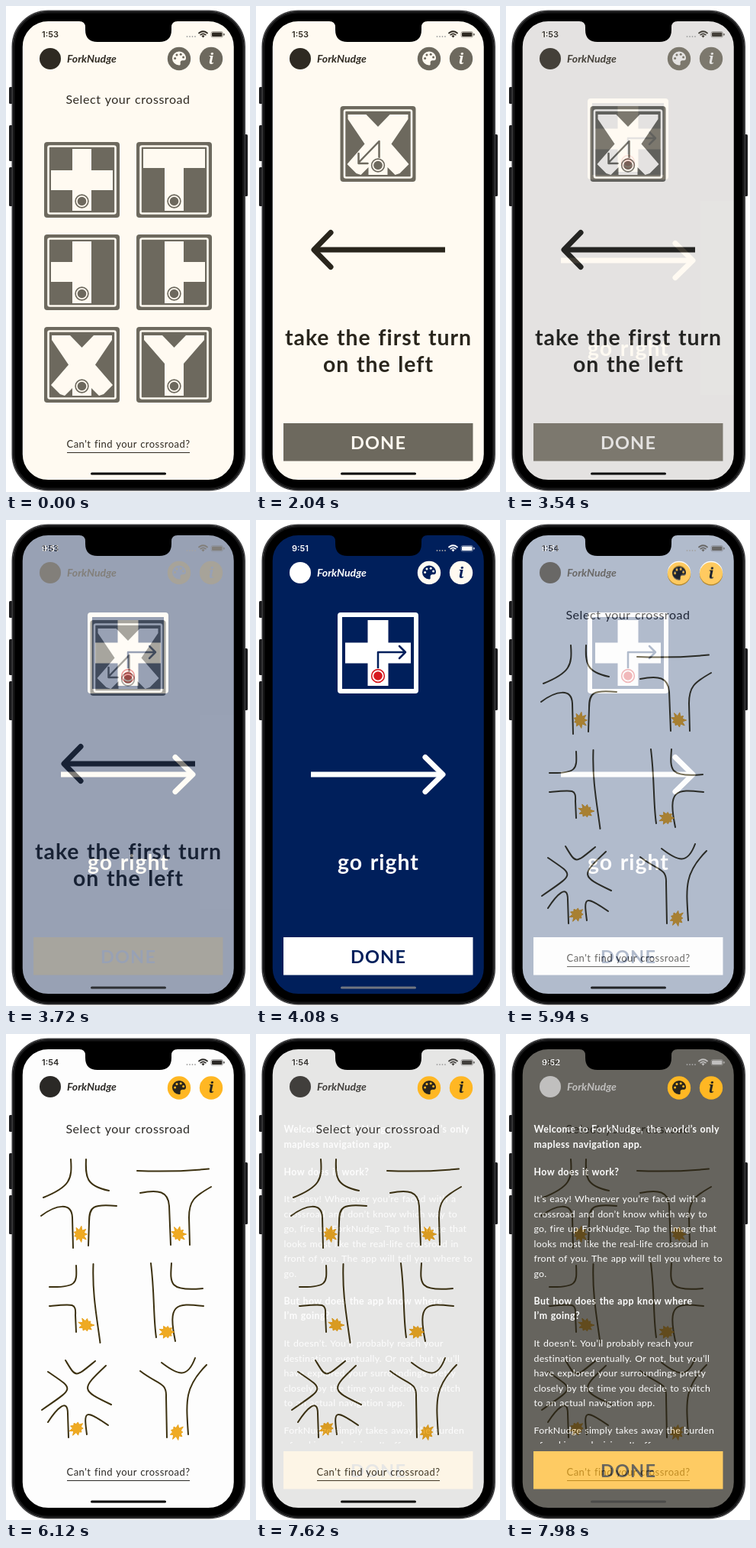
These frames come from a looping animation (320 px wide and 636 px high, 8 s). An HTML page:

```html
<!DOCTYPE html>
<html lang="en">
<head>
<meta charset="utf-8">
<title>Crossroad app</title>
<style>
  html, body { margin: 0; height: 100%; overflow: hidden; background: #fff; }
  svg { display: block; width: 100%; height: 100%; }
  text { font-family: Lato, "Open Sans", sans-serif; letter-spacing: .035em; word-spacing: .06em; }
  .mid { text-anchor: middle; }
  .copy { letter-spacing: .022em; }
  .clock { font: 600 11px Inter, sans-serif; letter-spacing: 0; }
  .brand { font: italic 700 14px Lato, sans-serif; letter-spacing: 0; }
  .info { font: italic 700 20px "Noto Serif", serif; letter-spacing: 0; }
  .done { font-weight: 700; letter-spacing: .05em; }
  .line { fill: none; stroke-linecap: round; stroke-linejoin: round; }
</style>
</head>
<body>
<svg id="stage" viewBox="0 0 320 636" xmlns="http://www.w3.org/2000/svg"></svg>
<script>
const LOOP = 8000, STEP = 60, STEPS = 10;
const GRAY = '#6d695e', CREAM = '#fffaf1', BLUE = '#001f5b', YELLOW = '#ffb723', DARK = '#29251c';

const sand  = { bg: CREAM, ink: '#2f2a22', badge: GRAY, glyph: CREAM, bar: '#000', cy: 69 };
const navy  = { bg: BLUE, ink: '#fff', badge: CREAM, glyph: BLUE, bar: '#717680', cy: 69 };
const paper = { bg: '#fdfdfd', ink: '#2b2926', badge: YELLOW, glyph: DARK, bar: '#000', cy: 70.5 };
const night = { bg: '#27241b', ink: '#fff', badge: YELLOW, glyph: DARK, bar: '#6c6b68', cy: 70.5 };

const rect = (x, y, w, h, fill, rx = 0) =>
  `<rect x="${x}" y="${y}" width="${w}" height="${h}" rx="${rx}" fill="${fill}"/>`;
const frame = (x, y, w, h, color, width, rx) =>
  `<rect x="${x}" y="${y}" width="${w}" height="${h}" rx="${rx}" fill="none" stroke="${color}" stroke-width="${width}"/>`;
const circle = (x, y, r, fill) => `<circle cx="${x}" cy="${y}" r="${r}" fill="${fill}"/>`;
const shape = (d, fill) => `<path d="${d}" fill="${fill}"/>`;
const line = (d, color, width) => `<path class="line" d="${d}" stroke="${color}" stroke-width="${width}"/>`;
const at = (x, y, content) => `<g transform="translate(${x} ${y})">${content}</g>`;
const text = (x, y, size, fill, content, weight = 400, cls = 'mid') =>
  `<text x="${x}" y="${y}" class="${cls}" font-size="${size}" font-weight="${weight}" fill="${fill}">${content}</text>`;

function header(theme, time) {
  const { ink, badge, glyph, cy } = theme;
  const dots = [237.5, 241, 244.5, 248].map(x => circle(x, 40, .9, '#a5a5a5')).join('');
  const wifi = line('M253 35.5Q258.5 31 264 35.5M255.2 37.6Q258.5 35 261.8 37.6', ink, 1.7) +
    shape('M256.4 39L258.5 41.4L260.6 39Q258.5 37.6 256.4 39Z', ink);
  const battery = `<g opacity=".4">${frame(269, 33.5, 15.5, 7.5, ink, 1, 2.2)}</g>` +
    rect(270, 34.5, 13.5, 5.5, ink, 1.3) + rect(285.4, 36, 1.2, 2.6, ink, .6);
  const palette = shape('M0-9A9 9 0 1 0 0 9C3.4 9 .4 5 2.4 3.4S9 4.6 9-.4C9-5.4 5-9 0-9Z', glyph) +
    [[-5.4, 0], [-3, -4.6], [2.2, -5.2], [5.6, -1.6]].map(([x, y]) => circle(x, y, 1.5, badge)).join('');
  return text(47, 41, 11, ink, time, 600, 'clock') + dots + wifi + battery +
    circle(58, 69, 14, ink) + text(80, 74, 14, ink, 'ForkNudge', 700, 'brand') +
    circle(227, cy, 15.2, badge) + at(227, cy - .5, palette) +
    circle(269, cy, 15.2, badge) + text(269, cy + 6.5, 20, glyph, 'i', 700, 'mid info');
}

const screen = (theme, time, content) =>
  rect(20, 18, 281, 604, theme.bg, 30) + header(theme, time) + content + rect(111, 610.5, 99, 3, theme.bar, 1.5);

const button = (fill, ink) =>
  rect(36, 546, 248.5, 49.5, fill) + text(160.5, 580, 23.5, ink, 'DONE', 700, 'mid done');

const chooser = (theme, titleY) =>
  text(160, titleY, 16, theme.ink, 'Select your crossroad') +
  text(160.5, 578, 13, theme.ink, "Can't find your crossroad?") + rect(80, 584, 161, 1, theme.ink);

const target = (x, y, color, back) =>
  circle(x, y, 10, back) + `<circle cx="${x}" cy="${y}" r="8.4" fill="none" stroke="${color}" stroke-width="1.6"/>` +
  circle(x, y, 5.8, color);

const STEM = 'M37 9H62V90H37Z';
const ROADS = [
  STEM + 'M9 37H90V63H9Z',
  STEM + 'M9 9H90V34H9Z',
  STEM + 'M9 36H37V62H9Z',
  STEM + 'M62 36H90V62H62Z',
  'M10 11H34L49.5 27L65 11H89V17L67 49.5L90 76L78 88L72 90L62 80V90H37V80L27 90L21 88L9 76L32 49.5L10 17Z',
  'M10 11H34L49.5 27L65 11H89V17L62 48V90H37V48L10 17Z'
];
const tile = (x, y, road, route = '') => at(x, y,
  rect(0, 0, 99, 99, GRAY, 4) + frame(5.5, 5.5, 88, 88, CREAM, 2.6, 2) + shape(road, CREAM) +
  route + target(49.5, 77.5, GRAY, CREAM));

const tiles = ROADS.map((road, i) => tile(50 + i % 2 * 121, 178 + (i >> 1) * 121, road)).join('');

const sandTurn =
  tile(110.5, 131, ROADS[4], line('M51 68V46L24 74M24 62V75H36', GRAY, 2.5)) +
  `<path d="M248 319H77" stroke="${DARK}" stroke-width="7"/>` + line('M98 296.5L76 319L98 341.5', DARK, 7) +
  text(160.5, 444, 28.4, DARK, 'take the first turn', 700) + text(160.5, 479, 28.4, DARK, 'on the left', 700) +
  button(GRAY, CREAM);

const navyTurn =
  frame(110, 124, 100, 100, '#fff', 6, 1) + shape('M146.5 131H173.5V217H146.5ZM117 160.5H203V187.5H117Z', '#fff') +
  line('M160 196V173H196M188 165L196 173L188 181', BLUE, 2.5) + target(160, 204, '#d71920', '#fff') +
  '<path d="M72 333H244" stroke="#fff" stroke-width="7"/>' + line('M222 310.5L245 333L222 355.5', '#fff', 7) +
  text(160.5, 458, 28.4, '#fff', 'go right', 700) + button('#fff', BLUE);

// Hand-drawn roads with a scribbled star at each starting point
const sketches = [
  'M85 164C87 190 84 200 49 214M105 164C104 187 105 199 135 205M46 238C66 223 86 220 87 240L88 280M145 225C114 222 109 226 109 246L108 277',
  'M172 179Q220 181 266 176.5M176 208C200 203 213 206 214 225L216 276M269 200C246 213 240 219 240 240L241 276',
  'M92 303C93 325 94 332 57 331M57 356C88 353 92 352 91 368L92 390M114.5 301C113 340 119 370 123.5 404',
  'M190 300C195 340 193 370 197 397M217 300C215 327 214 337 258 333M259 356C222 352 212 353 222 402',
  'M78 427C92 450 90 450 117 428M55 442C90 466 90 462 47 492M131 434C98 465 98 466 138 485M55 508C66 491 81 475 81 497L82 528M106 524C102 494 102 490 134 512',
  'M204 430C226 447 238 451 248 424M176 441C199 459 211 455 210 475L211 528M263 433C234 462 236 480 239 524'
].join('');

const star = ([x, y], seed) => {
  const points = Array.from({ length: 18 }, (_, i) => {
    const r = i % 2 ? 5.5 : 9.3 + 1.6 * Math.sin(i * 3.7 + seed), a = i * Math.PI / 9;
    return `${(r * Math.cos(a)).toFixed(1)} ${(r * Math.sin(a)).toFixed(1)}`;
  });
  return at(x, y, `<path d="M${points.join('L')}Z" fill="#efaa22" stroke="#e9a31c" stroke-linejoin="round"/>`);
};
const drawings = line(sketches, '#3c3110', 2) +
  [[97, 262], [226, 262], [105, 381], [211, 390], [93, 516], [224, 521]].map(star).join('');

const paragraphs = [
  [129, 700, ['Welcome to ForkNudge, the world’s only', 'mapless navigation app.']],
  [184.5, 700, ['How does it work?']],
  [220, 400, ['It’s easy! Whenever you’re faced with a', 'crossroad and don’t know which way to',
    'go, fire up ForkNudge. Tap the image that', 'looks most like the real-life crossroad in',
    'front of you. The app will tell you where to', 'go.']],
  [353.5, 700, ['But how does the app know where', 'I’m going?']],
  [409, 400, ['It doesn’t. You’ll probably reach your', 'destination eventually. Or not, but you’ll',
    'have explored your surroundings pretty', 'closely by the time you decide to switch', 'to an actual navigation app.']],
  [522.5, 400, ['ForkNudge simply takes away the burden', 'of making a decision. It offers']]
];
const about = '<g clip-path="url(#page)">' + paragraphs.map(([y, weight, rows]) =>
  rows.map((row, i) => text(36.5, y + i * 19.55, 12.35, '#fff', row, weight, weight === 400 ? 'copy' : '')).join('')).join('') +
  '</g>' + button(YELLOW, DARK);

const scenes = [
  { start: -STEP * STEPS, body: screen(sand, '1:53', chooser(sand, 128) + tiles) },
  { start: 1500, body: screen(sand, '1:53', sandTurn) },
  { start: 3540, body: screen(navy, '9:51', navyTurn) },
  { start: 5580, body: screen(paper, '1:54', chooser(paper, 130) + drawings) },
  { start: 7620, body: screen(night, '9:52', about) }
];

const buttons = [[4, 106, 22], [4, 156, 47], [4, 211, 51], [312, 168, 81]]
  .map(([x, y, h]) => rect(x, y, 5, h, '#1c1c1e', 1.5)).join('');
const bezel = frame(16.25, 14.5, 288, 611, '#000', 11, 39) +
  frame(10.25, 8.25, 301, 623.5, '#161617', 2.5, 45) + frame(8.25, 6.25, 305, 627.5, '#3a3a3c', 1.5, 47);
const notch = shape('M96 17V20Q104 20 104 28V31Q104 47 120 47H201Q217 47 217 31V28Q217 20 225 20V17Z', '#000');

const stage = document.getElementById('stage');
stage.innerHTML =
  '<defs><clipPath id="page"><rect x="22" y="90" width="277" height="446"/></clipPath></defs>' +
  buttons + rect(9, 7, 303.5, 626, '#000', 46) +
  scenes.map(s => `<g class="scene">${s.body}</g>`).join('') + bezel + notch;
const layers = stage.querySelectorAll('.scene');

const origin = performance.now();
function draw() {
  const t = (performance.now() - origin) % LOOP;
  scenes.forEach(({ start }, i) => {
    const step = Math.floor((t - start) / STEP) + 1;
    layers[i].setAttribute('opacity', Math.max(0, Math.min(1, step / STEPS)));
  });
  requestAnimationFrame(draw);
}
draw();
</script>
</body>
</html>
```
